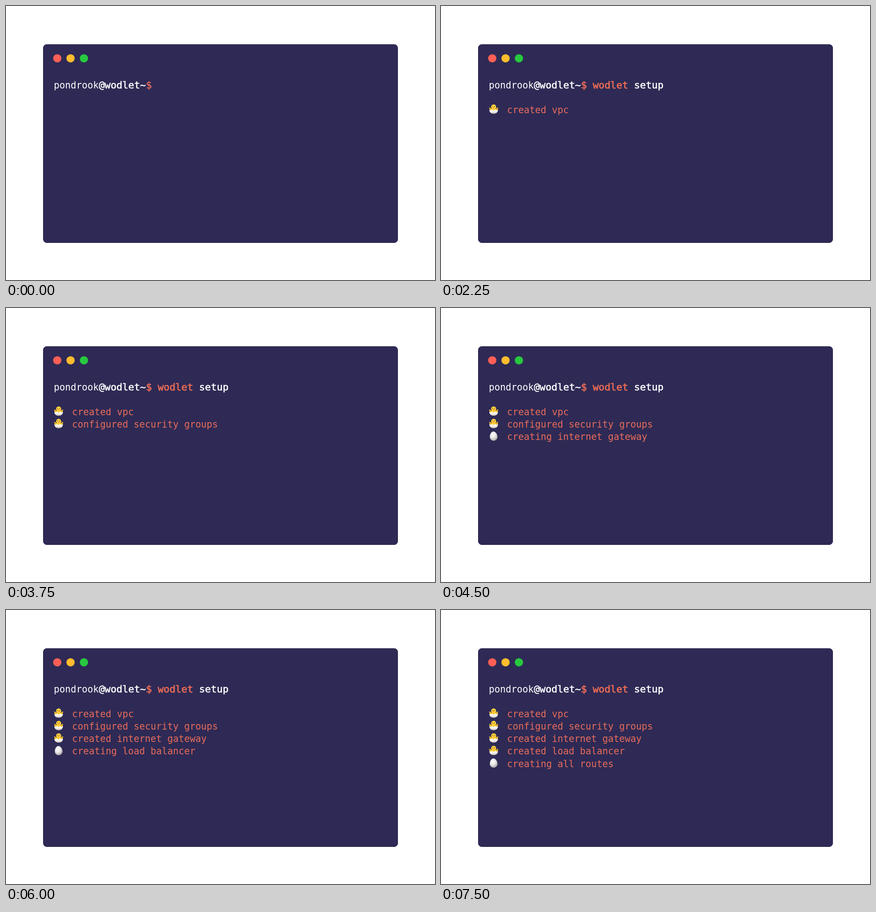
An HTML page that plays this animation: 937x598 px, repeating every 8 s.

```html
<!DOCTYPE html>
<html lang="en">
<head>
<meta charset="utf-8">
<title>Terminal setup</title>
<style>
  html, body { margin: 0; width: 100%; height: 100%; overflow: hidden; background: #fff; }
  svg { display: block; width: 100%; height: 100%; }
  text { font: 20.35px "DejaVu Sans Mono", monospace; white-space: pre; fill: #ea6c5a; }
  .prompt { fill: #fff; }
  .strong { font-size: 21.4px; stroke: #fff; stroke-width: .6px; }
  .accent { fill: #f4705a; stroke: #f4705a; stroke-width: .25px; }
  .heavy .accent { fill: #ec6b56; stroke: #ec6b56; stroke-width: .75px; }
</style>
</head>
<body>
<svg viewBox="0 0 937 598">
  <defs>
    <radialGradient id="shell" cx=".4" cy=".35" r=".7">
      <stop offset="0" stop-color="#fff"/>
      <stop offset=".5" stop-color="#e9e6e4"/>
      <stop offset="1" stop-color="#a5a0a2"/>
    </radialGradient>
    <linearGradient id="cup" x2="0" y2="1">
      <stop offset="0" stop-color="#fff"/>
      <stop offset=".6" stop-color="#eeeae6"/>
      <stop offset="1" stop-color="#b9b2ae"/>
    </linearGradient>
    <!-- Icons are centred on x = 0 with the text baseline at y = 0 -->
    <path id="egg" fill="url(#shell)" d="M-.5-18.7C4-18.7 8.4-12.5 8.4-7.2C8.4-1.8 4.7 1.4 0 1.4S-8.4-1.8-8.4-7.2C-8.4-12.5-5-18.7-.5-18.7Z"/>
    <g id="chick">
      <path fill="#f6bd28" d="M-9.8-12.5Q-7-12.8-5-10H5Q7-12.8 9.8-12.5Q9.7-8.5 6-5H-6Q-9.7-8.5-9.8-12.5Z"/>
      <circle cy="-13.8" r="5.5" fill="#ffd23e"/>
      <ellipse cy="-7.5" rx="6" ry="4" fill="#ffcb35"/>
      <circle cx="-2.2" cy="-14.8" r=".8" fill="#49311d"/>
      <circle cx="2.2" cy="-14.8" r=".8" fill="#49311d"/>
      <path fill="#ee7d24" d="M-1.8-13.2L0-14L1.8-13.2L0-11.4Z"/>
      <path fill="url(#cup)" d="M-9.2-8.2L-6.4-6.2L-3.4-8L0-5.8L3.4-8L6.4-6.2L9.2-8.2C10-2.5 5.6 1.3 0 1.3S-10-2.5-9.2-8.2Z"/>
    </g>
  </defs>
  <rect x="81.5" y="84" width="774" height="432.5" rx="7.5" fill="#2e2a55" stroke="#24204a"/>
  <circle cx="112" cy="114.2" r="9" fill="#ff5f56"/>
  <circle cx="141" cy="114.2" r="9" fill="#ffbd2e"/>
  <circle cx="170.2" cy="114.2" r="9" fill="#27c93f"/>
  <g id="prompt">
    <text class="prompt" x="104.5" y="180">pondrook</text>
    <text class="prompt strong" x="202.7" y="180">@wodlet~<tspan class="accent">$</tspan><tspan id="command"><tspan class="accent"> wodlet</tspan> setup</tspan></text>
  </g>
  <g id="log"></g>
</svg>
<script>
const LOOP = 8000, STEP = 750;
const tasks = [
  ["creating", "created", "vpc"],
  ["configuring", "configured", "security groups"],
  ["creating", "created", "internet gateway"],
  ["creating", "created", "load balancer"],
  ["creating", "created", "all routes"]
];
const byId = id => document.getElementById(id);

function logLine([active, finished, subject], index, step) {
  const start = 2 + index * 2;
  if (step < start) return "";
  const done = step > start;
  const y = 234 + index * 27.15;
  return `<use href="#${done ? "chick" : "egg"}" x="115" y="${y}"/>
    <text x="144.2" y="${y}">${done ? finished : active} ${subject}</text>`;
}

let shown = -1;
function draw(now) {
  const step = Math.floor(now % LOOP / STEP);
  if (step !== shown) {
    shown = step;
    byId("command").style.display = step ? "" : "none";
    byId("prompt").classList.toggle("heavy", step > 1);
    byId("log").innerHTML = tasks.map((task, i) => logLine(task, i, step)).join("");
  }
}

const begin = performance.now();
function tick() {
  draw(performance.now() - begin);
  requestAnimationFrame(tick);
}
tick();
</script>
</body>
</html>
```
